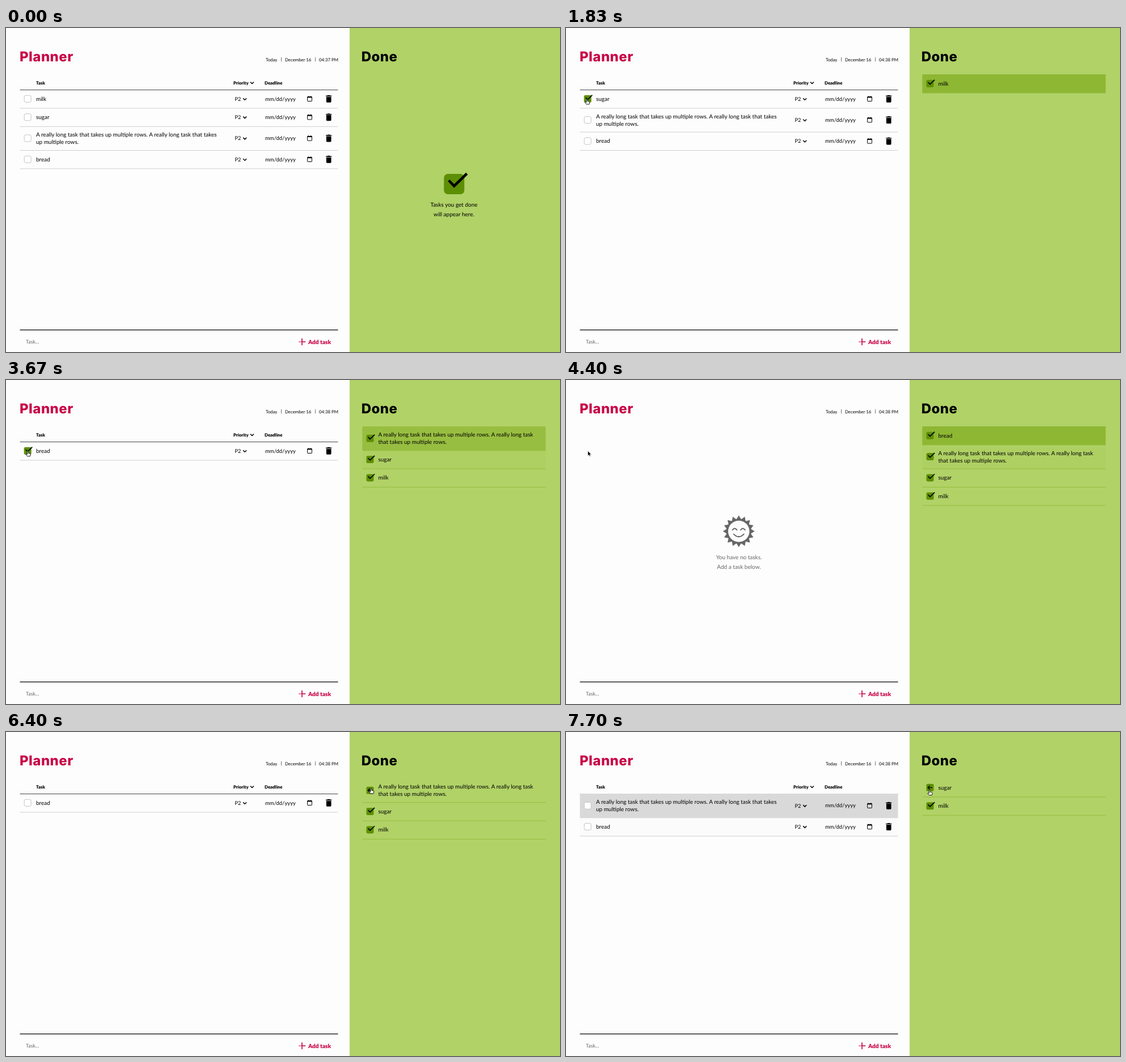
An HTML page that plays this animation: 977 px wide and 573 px high, repeating every 8 s.

```html
<!DOCTYPE html>
<html lang="en">
<head>
<meta charset="utf-8">
<title>Planner</title>
<style>
  html, body { margin: 0; width: 100%; height: 100%; overflow: hidden; background: #fdfdfd; }
  svg { display: block; width: 977px; height: 573px; font: 10px Lato, "Open Sans", sans-serif; text-rendering: geometricPrecision; }
  .title { font: 800 24px Inter, sans-serif; letter-spacing: .45px; }
  .head { font-size: 7.8px; font-weight: 900; }
  .clock { font-size: 7.8px; }
  .mid { text-anchor: middle; }
  .line { fill: none; stroke: #000; }
</style>
</head>
<body>
<svg viewBox="0 0 977 573">
  <defs>
    <g id="tick">
      <rect x="-18" y="-18" width="36" height="36" rx="7" fill="#5d8f05"/>
      <path class="line" d="M-9.5-6.5L0 3.5L22.5-18.5" stroke-width="4.6"/>
    </g>
    <g id="back">
      <rect x="-6.5" y="-6.5" width="13" height="13" rx="2.5" fill="#5d8f05"/>
      <path class="line" d="M4 0H-3.6M-.4-3.4L-3.8 0L-.4 3.4" stroke-width="1.3"/>
    </g>
    <rect id="box" x="-6" y="-6" width="12" height="12" rx="2.6" fill="#fff" stroke="#c4c4c4"/>
    <path id="chevron" class="line" d="M-3-1.5L0 1.5L3-1.5" stroke-width="1.5"/>
    <g id="date">
      <rect class="line" x="-3.9" y="-3.6" width="7.8" height="7.8" rx=".6"/>
      <path class="line" d="M-4-3H4" stroke-width="2"/>
      <path class="line" d="M-2.2-5V-3M2.2-5V-3"/>
    </g>
    <path id="bin" transform="scale(.72) translate(-12 -12)" d="M6 19c0 1.1.9 2 2 2h8c1.1 0 2-.9 2-2V7H6v12zM19 4h-3.5l-1-1h-5l-1 1H5v2h14V4z"/>
    <path id="hand" d="M-1 1Q0-.7 1 1V3.8L4 4.5Q5 5 4.8 6.4L4 9.4H-1L-3.6 6Q-3 4.8-1 6Z" fill="#fff" stroke="#000" stroke-width=".9"/>
    <path id="arrow" d="M0 0V8.5L2 6.7L3.3 9.6L4.8 9L3.5 6.2H6Z" stroke="#fff" stroke-width=".5"/>
  </defs>

  <rect width="606" height="573" fill="#fdfdfd"/>
  <rect x="606" width="371" height="573" fill="#b0d267"/>
  <text class="title" x="24" y="58.5" fill="#c90345">Planner</text>
  <text class="title" x="626.7" y="58.5">Done</text>
  <g class="clock">
    <text x="458" y="58.6">Today</text>
    <text x="484.5" y="58.4">|</text>
    <text x="492" y="58.6">December 16</text>
    <text x="544.3" y="58.4">|</text>
    <text id="clock" x="552" y="58.6"></text>
  </g>

  <g id="tableHead">
    <g class="head">
      <text x="53" y="99.8">Task</text>
      <text x="401" y="99.8">Priority</text>
      <text x="456" y="99.8">Deadline</text>
    </g>
    <use href="#chevron" x="434" y="97"/>
    <path class="line" d="M24.5 109.5H585.5" stroke-opacity=".72"/>
  </g>

  <g id="noTasks" fill="#666">
    <path id="rays"/>
    <g transform="translate(304.7 267.6)" fill="none" stroke="#666" stroke-width="2" stroke-linecap="round">
      <circle r="18.8" fill="#fdfdfd" stroke="none"/>
      <path d="M-11-2.5Q-7.2-7.5-3.4-2.5M3.4-2.5Q7.2-7.5 11-2.5M-9 5Q0 14 9 5"/>
    </g>
    <text class="mid" x="305" y="317">You have no tasks.</text>
    <text class="mid" x="305" y="333.6">Add a task below.</text>
  </g>

  <g id="noDone">
    <use href="#tick" x="790.3" y="276"/>
    <text class="mid" x="790" y="316">Tasks you get done</text>
    <text class="mid" x="790" y="332.5">will appear here.</text>
  </g>

  <g id="rows"></g>

  <path d="M24.5 534H585.5" stroke="#2b2426" stroke-width="1.5"/>
  <text x="35" y="558.2" fill="#666" style="font-size:8.9px">Task...</text>
  <path d="M516 555H522" stroke="#dd6a90" stroke-width="1.5"/>
  <path d="M522 555H528.3M522 549V561" stroke="#c90345" stroke-width="1.6"/>
  <text x="533" y="558.8" fill="#c90345" style="font-size:10.1px;font-weight:900">Add task</text>
  <use id="cursor"/>
</svg>
<script>
const LOOP = 8000;
const $ = id => document.getElementById(id);
const LONG = 'A really long task';
const REST = 'that takes up multiple rows.';
const tasks = [
  { open: ['milk'], doneAt: 1130 },
  { open: ['sugar'], doneAt: 1970 },
  { open: [`${LONG} ${REST} ${LONG} that takes`, 'up multiple rows.'],
    done: [`${LONG} ${REST} ${LONG}`, REST], doneAt: 2800, backAt: 7180 },
  { open: ['bread'], doneAt: 3690, backAt: 6330 },
];

// [time, x, y] of the cursor tip
const path = [
  [300, 330, 549], [930, 37, 125.3], [1830, 37, 125.5], [2530, 38, 126], [3670, 38.5, 125.5],
  [4450, 38.5, 125.5], [4900, 330, 150], [5330, 568, 138.5], [6000, 644, 99.5],
  [6400, 644, 99.5], [7180, 643, 100.5], [7700, 641.3, 102.3],
];
// [ms since the row moved, strength of its highlight]
const glow = [[0, 0], [100, 0], [350, 1], [730, 1], [870, .72], [1100, .07], [1700, .07], [2000, 0]];

// Interpolates a table of [time, ...values]
function sample(table, t, ease = k => k) {
  const last = table.length - 1;
  if (t <= table[0][0]) return table[0].slice(1);
  if (t >= table[last][0]) return table[last].slice(1);
  const i = table.findIndex(p => p[0] > t);
  const a = table[i - 1], b = table[i];
  const k = ease((t - a[0]) / (b[0] - a[0]));
  return a.slice(1).map((v, n) => v + (b[n + 1] - v) * k);
}
const smooth = k => k * k * (3 - 2 * k);

const use = (id, x, y) => `<use href="#${id}" x="${x}" y="${y}"/>`;
const smallTick = (x, y) => `<use href="#tick" transform="translate(${x} ${y}) scale(.36)"/>`;
const label = (x, y, s, size = 9.96) => `<text x="${x}" y="${y}" style="font-size:${size}px">${s}</text>`;

function drawList(list, side, t, tip) {
  const { left, right, top, icon, text, line, tint } = side;
  let y = top, out = '', hover = false;
  for (const { lines, since } of list) {
    const h = lines.length > 1 ? 42.2 : 32.4;
    const mid = y + h / 2 - .4;
    const over = tip && Math.abs(tip[0] - icon) < 7 && Math.abs(tip[1] - mid) < 7;
    hover = hover || over;
    const [alpha] = since ? sample(glow, t - since) : [0];
    out += `<path d="M${left} ${y + h}H${right}" stroke="${line}"/>`;
    if (alpha) out += `<rect x="${left}" y="${y - .5}" width="${right - left}" height="${h + .5}" fill="${tint}" opacity="${alpha}"/>`;
    lines.forEach((s, i) => {
      out += label(text, mid + 3.5 + (i - (lines.length - 1) / 2) * 13.2, s);
    });
    if (side.open) {
      out += over ? smallTick(icon, mid) : use('box', icon, mid);
      out += label(403.5, mid + 3.3, 'P2', 9.3) + use('chevron', 421.2, mid + .4)
        + label(457, mid + 3.2, 'mm/dd/yyyy', 9.5) + use('date', 535.5, mid) + use('bin', 569.2, mid);
    } else {
      out += over ? use('back', icon, mid) : smallTick(icon, mid);
    }
    y += h;
  }
  return { out, hover };
}

const openSide = { open: true, left: 24.5, right: 585.5, top: 109.5, icon: 38.2, text: 53, line: '#cfcfcf', tint: '#d9d9d9' };
const doneSide = { left: 628.3, right: 951.7, top: 82.5, icon: 642, text: 656.5, line: '#95be3e', tint: '#8eb733' };

function draw(t) {
  const open = [], done = [];
  for (const task of tasks) {
    const back = t >= task.backAt;
    if (t >= task.doneAt && !back) done.unshift({ lines: task.done || task.open, since: task.doneAt });
    else open.push({ lines: task.open, since: back ? task.backAt : 0 });
  }
  const tip = t >= 300 ? sample(path, t, smooth) : null;
  const a = drawList(open, openSide, t, tip);
  const b = drawList(done, doneSide, t, tip);
  $('rows').innerHTML = a.out + b.out;

  const show = (id, on) => $(id).setAttribute('visibility', on ? 'visible' : 'hidden');
  show('tableHead', open.length);
  show('noTasks', !open.length);
  show('noDone', !done.length);
  show('cursor', tip);
  $('clock').textContent = t < 600 ? '04:37 PM' : '04:38 PM';
  if (tip) {
    $('cursor').setAttribute('href', a.hover || b.hover ? '#hand' : '#arrow');
    $('cursor').setAttribute('transform', `translate(${tip})`);
  }
}

// Sixteen slender rays on a ring around the face
const polar = (r, turn) => [304.7 + r * Math.cos(turn * Math.PI / 8), 267.6 + r * Math.sin(turn * Math.PI / 8)]
  .map(v => v.toFixed(2)).join(' ');
let rays = 'M' + polar(21.8, -.5);
for (let i = 0; i < 16; i++) {
  rays += `Q${polar(24, i - .25)} ${polar(28, i)}Q${polar(24, i + .25)} ${polar(21.8, i + .5)}`;
}
$('rays').setAttribute('d', rays + 'Z');

const start = performance.now();
function tick() {
  draw((performance.now() - start) % LOOP);
  requestAnimationFrame(tick);
}
tick();
</script>
</body>
</html>
```
